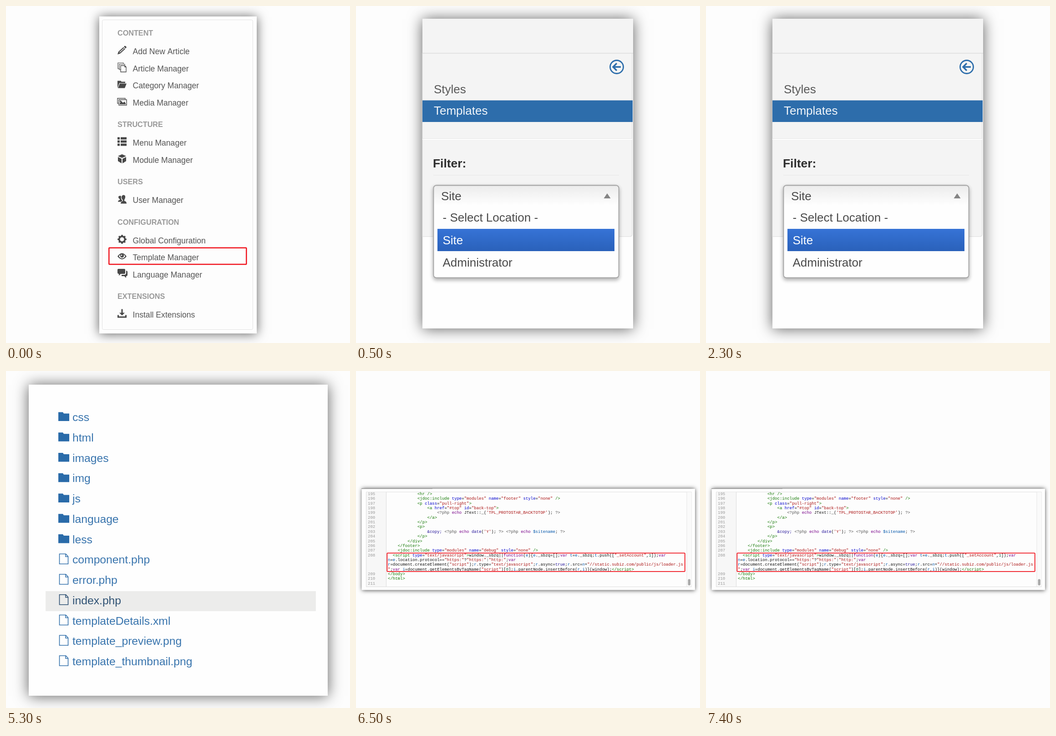
These frames come from a looping animation (756 px wide and 741 px high, 8 s). An HTML page with a canvas:

```html
<!DOCTYPE html>
<html lang="en">
<head>
<meta charset="utf-8">
<title>Template editing steps</title>
<style>
html, body { margin: 0; width: 100%; height: 100%; overflow: hidden; background: #fdfdfd; }
canvas { display: block; }
</style>
</head>
<body>
<canvas id="stage" width="756" height="741"></canvas>
<script>
const ctx = document.getElementById('stage').getContext('2d');
const SANS = '"Liberation Sans", Arial, sans-serif';
const MONO = '"Liberation Mono", "Courier New", monospace';
const PAPER = '#fdfdfd', BLUE = '#2d6dab', RED = '#f0141e';

function text(str, x, y, font, color) {
  ctx.font = font;
  ctx.fillStyle = color;
  ctx.fillText(str, x, y);
}

function rect(x, y, w, h, color) {
  ctx.fillStyle = color;
  ctx.fillRect(x, y, w, h);
}

function frame(x, y, w, h, radius, stroke, width = 1, fill) {
  ctx.beginPath();
  ctx.roundRect(x, y, w, h, radius);
  if (fill) {
    ctx.fillStyle = fill;
    ctx.fill();
  }
  ctx.strokeStyle = stroke;
  ctx.lineWidth = width;
  ctx.stroke();
}

function card(x, y, w, h, blur, alpha, drop = 0) {
  ctx.save();
  ctx.shadowColor = `rgba(0,0,0,${alpha})`;
  ctx.shadowBlur = blur;
  ctx.shadowOffsetY = drop;
  rect(x, y, w, h, '#fefefe');
  ctx.restore();
}

function gradient(y0, y1, from, to) {
  const g = ctx.createLinearGradient(0, y0, 0, y1);
  g.addColorStop(0, from);
  g.addColorStop(1, to);
  return g;
}

// Draws path data around (x, y); stroked when a line width is given.
function shape(x, y, data, color, width) {
  ctx.save();
  ctx.translate(x, y);
  ctx.fillStyle = ctx.strokeStyle = color;
  ctx.lineWidth = width || 1;
  const path = new Path2D(data);
  if (width) ctx.stroke(path);
  else ctx.fill(path, 'evenodd');
  ctx.restore();
}

function gearPath() {
  let d = '';
  for (let i = 0; i < 32; i++) {
    const a = (i - 0.5) * Math.PI / 16;
    const r = i % 4 < 2 ? 10 : 8;
    d += `${i ? 'L' : 'M'}${r * Math.cos(a)} ${r * Math.sin(a)}`;
  }
  return d + 'ZM4.5 0A4.5 4.5 0 1 0 -4.5 0A4.5 4.5 0 1 0 4.5 0Z';
}

function listPath() {
  return [-10, -3, 4].map(y => `M-10 ${y}h5v5h-5zM-3 ${y}h13v5h-13z`).join('');
}

// Each icon is a list of [path data, line width or 0 for fill].
const icons = {
  pencil: [['M-10 9L-8 3L3 -7L7 -3L-4 7ZM4 -8L6 -10Q8 -10 10 -7L8 -4ZM-6 4L-5 5L5 -4L4 -5Z', 0]],
  copy: [['M-5 3H-9V-10H3V-8M-2 5H-6V-7H6V-5', 1.2], ['M-3 -4H6L9 -1V10H-3ZM6 -4V-1H9', 1.3]],
  folder: [['M-10 8V-8H-3L-1 -6H7V-3H-6ZM-5 -2H10L6 8H-9Z', 0]],
  images: [['M-8 4H-10V-7H7V-5', 1.3], ['M-7 -4H10V8H-7Z', 1.4],
    ['M-5 6V3L-1 -1L2 3L5 0L8 4V6ZM-5 -2h3v3h-3z', 0]],
  list: [[listPath(), 0]],
  cube: [['M0 -10L9 -6L0 -2L-9 -6ZM-9 -4L-1 0V10L-9 5ZM9 -4L1 0V10L9 5Z', 0]],
  users: [['M-5 -7Q-2 -8 -2 -5Q-3 1 1 3L-2 6H-9Q-9 3 -5 2V0Q-8 -2 -8 -4Q-8 -7 -5 -7Z', 0],
    ['M3 -9Q8 -9 7 -3Q6 0 5 2V4Q10 5 10 10H-3Q-3 6 2 4V2Q-1 0 -1 -4Q-1 -8 3 -9Z', 0]],
  gear: [[gearPath(), 0]],
  eye: [['M-10 0Q0 -14 10 0Q0 13 -10 0ZM-7 0Q0 9 7 0Q5 -4 3 -4A4 4 0 1 1 -3 -4Q-6 -3 -7 0ZM0 -4A2 2 0 0 0 -2 -1L0 -1Z', 0]],
  chat: [['M-8 -10H5Q7 -10 7 -8V-1Q7 1 5 1H-3L-7 5V1Q-10 1 -10 -2V-8Q-10 -10 -8 -10Z', 0],
    ['M9 -6Q12 -6 12 -3V3Q12 6 9 6V10L5 6H-1V3H6Q9 2 9 -1Z', 0]],
  install: [['M-1.5 -10H1.5V-2H6L0 4L-6 -2H-1.5ZM-10 3H-7V6H7V3H10V9H-10Z', 0]]
};

const menu = [
  ['CONTENT', 65, [['pencil', 'Add New Article'], ['copy', 'Article Manager'],
    ['folder', 'Category Manager'], ['images', 'Media Manager']]],
  ['STRUCTURE', 266, [['list', 'Menu Manager'], ['cube', 'Module Manager']]],
  ['USERS', 392, [['users', 'User Manager']]],
  ['CONFIGURATION', 480.5, [['gear', 'Global Configuration'], ['eye', 'Template Manager'],
    ['chat', 'Language Manager']]],
  ['EXTENSIONS', 644, [['install', 'Install Extensions']]]
];

function drawMenu() {
  card(205, 23, 346, 697, 23, 0.62, 1);
  frame(211.5, 30.5, 331, 681, 3, '#e2e2e2', 1, PAPER);
  for (const [title, top, items] of menu) {
    text(title, 245, top, `bold 16.2px ${SANS}`, '#999');
    items.forEach(([icon, label], i) => {
      const y = top + 41 + i * 37.5;
      for (const [data, width] of icons[icon]) shape(255, y - 8.5, data, '#484848', width);
      text(label, 278.5, y, `17.6px ${SANS}`, '#555');
    });
  }
  frame(226.3, 531.7, 302, 36.3, 1, RED, 2.5);
}

function drawFilter() {
  const font = `26px ${SANS}`;
  card(146, 28, 463, 681, 30, 0.62, 1);
  rect(146, 28, 463, 75, '#f4f4f4');
  rect(146, 103, 463, 1.5, '#dcdcdc');
  ctx.beginPath();
  ctx.roundRect(146, 104, 461, 403, [0, 0, 5, 0]);
  ctx.fillStyle = '#f4f4f4';
  ctx.fill();
  ctx.strokeStyle = '#dedede';
  ctx.lineWidth = 1.2;
  ctx.stroke();
  rect(146, 291, 461, 1, '#e4e4e4');
  rect(146, 292, 461, 2, '#fff');

  shape(573, 134, 'M14.5 0A14.5 14.5 0 1 1 -14.5 0A14.5 14.5 0 1 1 14.5 0', BLUE, 2.8);
  shape(573, 134, 'M9 0H-7M0 -8L-8 0L0 8', BLUE, 3.4);
  text('Styles', 171, 191.5, font, '#585858');
  rect(146, 207.5, 462, 47.5, BLUE);
  text('Templates', 171, 239, font, '#f2f6fa');
  text('Filter:', 169, 355, `bold 26.4px ${SANS}`, '#2e2e2e');
  rect(170, 371.5, 408, 1, '#e7e7e7');

  ctx.save();
  ctx.shadowColor = 'rgba(0,0,0,.3)';
  ctx.shadowBlur = 8;
  ctx.shadowOffsetY = 4;
  frame(170.5, 394.5, 407, 203, 6, '#aaa', 1.8, '#fefefe');
  ctx.restore();
  frame(170.5, 394.5, 407, 203, 6, '#a8a8a8', 1.8, gradient(395, 438, '#ececec', '#fefefe'));
  shape(552, 418, 'M-7.5 5L0 -6L7.5 5Z', '#858585');
  rect(179, 490, 389, 49, gradient(490, 539, '#3673d6', '#2a61ba'));
  text('Site', 187, 427, font, '#4a4a4a');
  text('- Select Location -', 190.5, 474, font, '#4a4a4a');
  text('Site', 190.5, 523.5, font, '#fff');
  text('Administrator', 190.5, 573, font, '#4a4a4a');
}

const files = ['css', 'html', 'images', 'img', 'js', 'language', 'less', 'component.php', 'error.php',
  'index.php', 'templateDetails.xml', 'template_preview.png', 'template_thumbnail.png'];

function drawFiles() {
  card(50, 30, 657, 684, 30, 0.62, 1);
  rect(87, 484, 594, 44, '#ececeb');
  files.forEach((name, i) => {
    const y = 110 + i * 44.75;
    const color = name === 'index.php' ? '#2f5274' : '#3874ad';
    if (name.includes('.')) {
      shape(116.5, y - 22, 'M1 1H15L20 6.5V23H1ZM14.5 1V7H20', color, 1.6);
    } else {
      shape(115, y - 19.5, 'M0 0H10L12 3H24V19.5H0Z', '#2a6ba9');
    }
    text(name, 146, y, `24.7px ${SANS}`, color);
  });
}

// [line number, indent, code]; wrapped rows carry no number.
const code = [
  [195, 12, '<hr />'],
  [196, 12, '<jdoc:include type="modules" name="footer" style="none" />'],
  [197, 12, '<p class="pull-right">'],
  [198, 16, '<a href="#top" id="back-top">'],
  [199, 20, "<?php echo JText::_('TPL_PROTOSTAR_BACKTOTOP'); ?>"],
  [200, 16, '</a>'],
  [201, 12, '</p>'],
  [202, 12, '<p>'],
  [203, 16, "&copy; <?php echo date('Y'); ?> <?php echo $sitename; ?>"],
  [204, 12, '</p>'],
  [205, 8, '</div>'],
  [206, 4, '</footer>'],
  [207, 4, '<jdoc:include type="modules" name="debug" style="none" />'],
  [208, 2, '<script type="text/javascript">window._sbzq||function(e){e._sbzq=[];var t=e._sbzq;t.push(["_setAccount",1]);var'],
  ['', 0, 'n=e.location.protocol=="https:"?"https:":"http:";var'],
  ['', 0, 'r=document.createElement("script");r.type="text/javascript";r.async=true;r.src=n+"//static.subiz.com/public/js/loader.js'],
  ['', 0, '";var i=document.getElementsByTagName("script")[0];i.parentNode.insertBefore(r,i)}(window);<\/script>'],
  [209, 0, '</body>'],
  [210, 0, '</html>'],
  [211, 0, '']
];

const syntax = [
  ['string', '^"(?=;)|"[^"]*(?:"|$)|\'[^\']*\'', '#a11'],
  ['meta', '<\\?php|\\?>', '#555'],
  ['tag', '<\\/?[\\w:]+|\\/?>', '#170'],
  ['attribute', '(?<=\\s)\\w+(?==")', '#00c'],
  ['keyword', '\\b(?:var|function|echo)\\b', '#708'],
  ['atom', '&copy;|\\btrue\\b|\\bdate\\b', '#219'],
  ['local', '\\$sitename|\\b[etrni]\\b(?=[.=,)+])', '#05a'],
  ['number', '\\b\\d\\b', '#164'],
  ['plain', '[\\w:]+|\\S', '#111']
];
const tokens = new RegExp(syntax.map(([name, rule]) => `(?<${name}>${rule})`).join('|'), 'g');

function drawCode() {
  const font = `9px ${MONO}`, advance = 5.41, left = 70;
  card(12.5, 259, 732.5, 222.5, 9, 0.75);
  rect(12, 258, 156, 1.2, '#888');
  frame(22.5, 266, 715, 208.5, 0, '#ddd', 1, PAPER);
  rect(23, 266.5, 43, 207.5, '#f7f7f7');
  rect(66, 266, 1, 208, '#ddd');
  rect(727, 266.5, 10.5, 207.5, '#fafafa');
  rect(726.5, 266, 1, 208, '#e5e5e5');
  ctx.beginPath();
  ctx.roundRect(729.5, 457.5, 5.5, 14, 2.7);
  ctx.fillStyle = '#aaa';
  ctx.fill();

  code.forEach(([number, indent, line], row) => {
    const y = 273 + row * 10.35;
    text(String(number), 26, y, font, '#999');
    for (const match of line.matchAll(tokens)) {
      const color = syntax.find(([name]) => match.groups[name] !== undefined)[2];
      text(match[0], left + (indent + match.index) * advance, y, font, color);
    }
  });
  frame(68.3, 400.3, 654.5, 40.5, 1, RED, 1.8);
}

const LOOP = 8000;
const scenes = [[0, drawMenu], [500, drawFilter], [3500, drawFiles], [6500, drawCode]];
let shown = null;

function tick() {
  const time = performance.now() % LOOP;
  const draw = scenes.findLast(([start]) => time >= start)[1];
  if (draw !== shown) {
    rect(0, 0, 756, 741, PAPER);
    draw();
    shown = draw;
  }
  requestAnimationFrame(tick);
}
tick();
</script>
</body>
</html>
```
